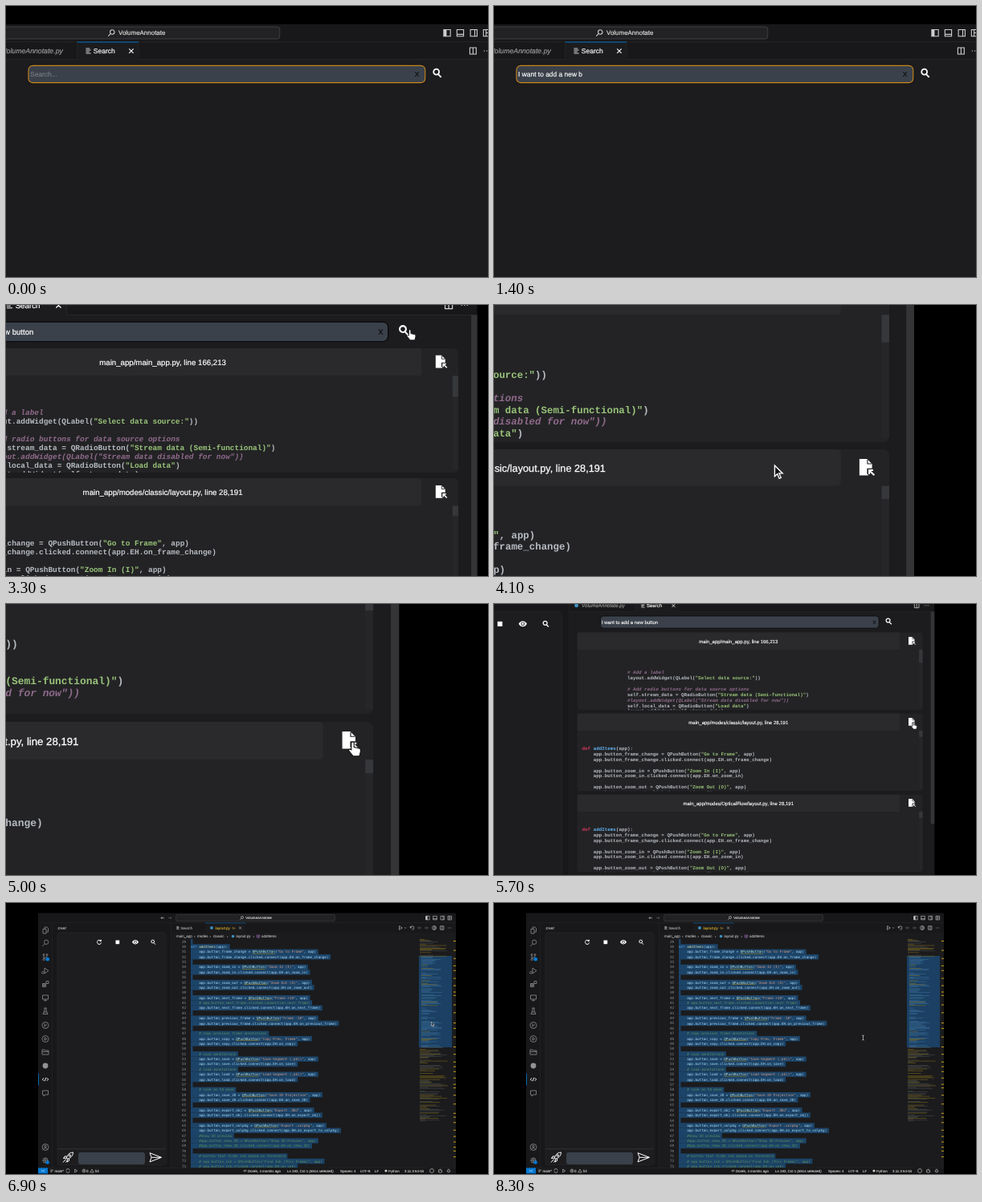
These frames come from a looping animation (600x338 px, 8400 ms). An HTML page:

```html
<!DOCTYPE html>
<html lang="en">
<head>
<meta charset="utf-8">
<title>Code search</title>
<style>
html, body { margin: 0; width: 100%; height: 100%; overflow: hidden; background: #000; }
#stage { display: block; width: 100vw; height: 100vh; }
text { font-family: "Liberation Sans", Arial, sans-serif; white-space: pre; text-rendering: geometricPrecision; }
.result { font: bold 4.59px "Liberation Mono", monospace; }
.code { font: 4.25px "DejaVu Sans Mono", monospace; }
.line { fill: none; stroke: #d0d0d0; stroke-width: .6; }
</style>
</head>
<body>
<svg id="stage" viewBox="0 0 600 338"><g id="world"></g></svg>
<script>
const LOOP = 8400, SHOW_RESULTS = 2300, OPEN_FILE = 6500;
const QUERY = 'I want to add a new button';

// Drawing helpers
const rect = (x, y, w, h, fill, more = '') =>
  `<rect x="${x}" y="${y}" width="${w}" height="${h}" fill="${fill}" ${more}/>`;
const dot = (x, y, r, fill) => `<circle cx="${x}" cy="${y}" r="${r}" fill="${fill}"/>`;
const label = (x, y, str, fill = '#d4d4d4', size = 4.5, more = '') =>
  `<text x="${x}" y="${y + size * .35}" fill="${fill}" stroke="${fill}" stroke-width=".1" font-size="${size}" ${more}>${str}</text>`;
const icon = (x, y, d, more = '') =>
  `<path class="line" transform="translate(${x} ${y})" d="${d}" ${more}/>`;
const group = (id, body) => `<g id="${id}">${body}</g>`;
const style = (color, width) => `style="stroke:${color};stroke-width:${width}"`;
const solid = 'style="fill:#fff;stroke:none"';

const GLASS = 'M1 .8L3 2.9M1.6-.8a1.9 1.9 0 1 1-3.8 0a1.9 1.9 0 1 1 3.8 0';
const TITLE_GLASS = 'M-.7.6L-2.3 2.2M2-.6a1.5 1.5 0 1 1-3 0a1.5 1.5 0 1 1 3 0';
const CLOSE = 'M-1.5-1.5L1.5 1.5M1.5-1.5L-1.5 1.5';
const SPLIT = 'M-2.2-2.2H2.2V2.2H-2.2ZM0-2.2V2.2';
const LIST = 'M-1.7-1.6H1M-1.7-.5H1.7M-1.7.6H.7M-1.7 1.7H1.7';
const RING = 'M2.5 0a2.5 2.5 0 1 1-5 0a2.5 2.5 0 1 1 5 0';
const DOTS = 'M-2 0h.7M-.3 0h.7M1.4 0h.7';

// Source text
const pair = (name, title, handler = name) => [
  `app.button_${name} = QPushButton("${title}", app)`,
  `app.button_${name}.clicked.connect(app.EH.on_${handler})`];
const intro = [...pair('frame_change', 'Go to Frame'), '', ...pair('zoom_in', 'Zoom In (I)'), '',
  ...pair('zoom_out', 'Zoom Out (O)')];
const nextFrame = pair('next_frame', 'Frame +10');
const indent = s => s && '    ' + s;
const itemLines = ['def addItems(app):', ...intro.map(indent)];
const fileLines = ['', ...itemLines, ...[
  '', nextFrame[0], '# app.button_next_frame.clicked.connect(on_next_frame)', nextFrame[1], '',
  ...pair('previous_frame', 'Frame -10'), '',
  '# copy previous frame annotations', ...pair('copy', 'Copy Prev. Frame'), '',
  '# save annotations', ...pair('save', 'Save Segment (.pkl)'),
  '# load annotations', ...pair('load', 'Load Segment (.pkl)'), '',
  '# save as 2d mask', ...pair('save_2D', 'Save 2D Projection'), '',
  ...pair('export_obj', 'Export .OBJ'), '',
  ...pair('export_volpkg', 'Export .volpkg', 'export_to_volpkg'),
  '#Show 3D preview', ...pair('show_3D', 'Show 3D Preview').map(s => '#' + s), '',
  '# button that finds ink based on threshold',
  ...pair('ink', 'Find Ink (This Frame)').map(s => '# ' + s)
].map(indent)];
const labelLines = ['# Add a label', 'layout.addWidget(QLabel("Select data source:"))', '',
  '# Add radio buttons for data source options',
  'self.stream_data = QRadioButton("Stream data (Semi-functional)")',
  '#layout.addWidget(QLabel("Stream data disabled for now"))',
  'self.local_data = QRadioButton("Load data")', 'layout.addWidget(self.stream_data)'];

const resultTheme = { text: '#b6bac1', comment: '#8f6a8b', string: '#98c379', def: '#d2365a', name: '#61afef', call: '#b6bac1', slant: 'italic' };
const fileTheme = { text: '#aedcf8', comment: '#5d9159', string: '#d59a80', def: '#569cd6', name: '#dcdcaa', call: '#c3e2cf', slant: 'normal' };
const paint = (src, theme) => {
  const span = (s, c) => `<tspan fill="${theme[c]}">${s}</tspan>`;
  if (/^\s*#/.test(src)) return `<tspan font-style="${theme.slant}">${span(src, 'comment')}</tspan>`;
  return src.replace(/("[^"]*")|\b(def)\b|(addItems)|(QPushButton)/g,
    (m, str, def, name) => span(m, str ? 'string' : def ? 'def' : name ? 'name' : 'call'));
};
const codeLine = (x, y, src, cls, theme) =>
  `<text class="${cls}" x="${x}" y="${y}" fill="${theme.text}">${paint(src, theme)}</text>`;

// Window frame, activity bar and chat panel
const activity = [
  [34, 'M-3-1.5H1V4H-3ZM-1-1.5V-4H2L3.5-2.5V2H1'],
  [50, 'M-.8 1L-3.7 4M3.8-1.2a2.7 2.7 0 1 1-5.4 0a2.7 2.7 0 1 1 5.4 0'],
  [67.5, 'M-2-2V2M-2 1C1 1 2 0 2-2M-1-3a1 1 0 1 1-2 0a1 1 0 1 1 2 0M3-3a1 1 0 1 1-2 0a1 1 0 1 1 2 0M-1 3a1 1 0 1 1-2 0a1 1 0 1 1 2 0'],
  [84.5, 'M-1-3.5L4 0L-1 3.5ZM-3 1a1.4 1.4 0 1 0 .1 0'],
  [101.5, 'M-3.5-1H.5V3H-3.5ZM-3.5 1H.5M-1.5-1V3M1-4H4V-1H1Z'],
  [118, 'M-3.5-3H3.5V2H-3.5ZM-2 3.7H2M0 2V3.7'],
  [135, 'M-1.5-4H1.5M-1-4V-1L-3 3.5H3L1-1V-4M-2 1H2'],
  [152.5, 'M4 0a4 4 0 1 1-8 0a4 4 0 1 1 8 0M-1-2V2M-1 1L2-1'],
  [169.5, 'M4 0a4 4 0 1 1-8 0a4 4 0 1 1 8 0M-1-1.7L2 0L-1 1.7Z'],
  [186, 'M-4-3H-1L0-2H4V3H-4ZM-4-.5H4'],
  [237, 'M-3.5-3H3.5V2H0L-2 4V2H-3.5Z'],
  [304.5, 'M4 0a4 4 0 1 1-8 0a4 4 0 1 1 8 0M1.3-1a1.3 1.3 0 1 1-2.6 0a1.3 1.3 0 1 1 2.6 0M-2.7 3C-2 .5 2 .5 2.7 3'],
  [321, RING + 'M1 0a1 1 0 1 1-2 0a1 1 0 1 1 2 0M0-4V-2.5M0 4V2.5M-4 0H-2.5M4 0H2.5M-2.8-2.8L-1.8-1.8M2.8 2.8L1.8 1.8M2.8-2.8L1.8-1.8M-2.8 2.8L-1.8 1.8']
];
const shell = [
  rect(40, 12.6, 520, 324.8, '#18181a'),
  rect(40, 24.6, 520, .4, '#2b2b2d'),
  rect(211.5, 14.4, 198, 8.3, '#222224', 'rx="1.6" stroke="#444447" stroke-width=".5"'),
  icon(293.5, 18.6, TITLE_GLASS),
  label(298.3, 18.6, 'VolumeAnnotate', '#dcdcdc', 4.42),
  icon(195, 18.6, 'M2 0H-2M-.5-1.5L-2 0L-.5 1.5'),
  icon(204, 18.6, 'M-2 0H2M.5-1.5L2 0L.5 1.5', style('#666', .6)),
  ...[524.9, 534, 543.3, 552.3].map((x, i) =>
    icon(x, 18.6, 'M-2.3-2.3H2.3V2.3H-2.3Z' + ['M-.7-2.3V2.3', 'M-2.3 1H2.3', 'M.7-2.3V2.3', 'M-.5-2.3V2.3M-.5 0H2.3'][i])),
  rect(522.7, 16.4, 1.7, 4.5, '#d0d0d0'),
  rect(57.6, 25, .4, 305, '#2b2b2d'),
  ...activity.map(([y, d]) => icon(49, y, d, style('#939395', .75))),
  dot(49, 203, 3.4, '#939395'),
  icon(49, 220, 'M-2-1.8L-3.6 0L-2 1.8M2-1.8L3.6 0L2 1.8M.8-2.2L-.8 2.2', style('#fff', .9)),
  rect(40, 212.5, .8, 15, '#0078d4'), dot(51.7, 70.2, 2.4, '#0078d4'), dot(51.7, 323.5, 2.2, '#0078d4'),
  label(64.5, 31.5, 'CHAT', '#d0d0d0', 4.1),
  rect(64, 37, 135.2, 290, '#1d1c1e', 'rx="4" stroke="#29292b" stroke-width=".5"'),
  rect(64, 306.6, 135.2, .5, '#48484b'),
  icon(116, 48.8, 'M2-1.7A2.6 2.6 0 1 0 2.6.7M2.4-3V-1.2H.6', style('#fff', 1)),
  rect(136.5, 46.5, 4.7, 4.7, '#fff'),
  icon(161, 48.8, 'M-4 0C-2-3.7 2-3.7 4 0C2 3.7-2 3.7-4 0Z', solid),
  dot(161, 48.8, 1.8, '#1d1c1e'), dot(161, 48.8, 1.1, '#fff'),
  icon(183, 48.8, GLASS, style('#fff', 1)),
  icon(77.5, 317, 'M-2 1.5C-2-2 1.5-6 6-6C6-1.5 2 2-1.5 2ZM-2-1H-4.5L-6 1.5L-2 1M1 2V4.5L-1.5 6L-1 2M-3 2.5L-6.5 6.5M-1 4L-3 6.5M3-2a1.2 1.2 0 1 1-2.4 0a1.2 1.2 0 1 1 2.4 0', style('#fff', 1)),
  rect(90, 311, 83, 15, '#3a414a', 'rx="3"'),
  icon(186, 317.3, 'M-7-5.6L7.5 0L-7 5.6L-5 0ZM-5 0H7', style('#fff', 1)),
  rect(205.6, 25, .4, 305, '#2b2b2d'),
  rect(40, 330, 520, .4, '#2b2b2d'),
  rect(40, 330.4, 12, 7, '#0078d4'),
  icon(46, 334, 'M-2-1.5L-.5 0L-2 1.5M2-1.5L.5 0L2 1.5', style('#fff', .6)),
  icon(57, 334, 'M-1-2V2M1-2V0L-1 1'), label(60.5, 334, 'main*'),
  icon(77, 334, 'M2-.5A2 2 0 0 0-2-.5M-2 .5A2 2 0 0 0 2 .5'),
  icon(87, 334, 'M-1.3-2L1.8 0L-1.3 2Z'),
  icon(97, 334, 'M2 0a2 2 0 1 1-4 0a2 2 0 1 1 4 0M-.8-.8L.8.8M.8-.8L-.8.8'), label(100, 334, '0'),
  icon(107, 334, 'M0-2L2.3 2H-2.3Z'), label(110.8, 334, '54')
].join('');

// Search page
const PAGE = '#1c1b1d';
const CARD = { x: 213.7, w: 335, h: 75.4, head: 16.8, step: 78.7, top: 57 };
const fileIcon = (x, y) =>
  icon(x, y, 'M-3.3-3.8H.2L2.5-1.5V.5H.2V3L1 3.8H-3.3Z', solid) +
  icon(x, y, 'M.4-3.5V-1.6H2.3', style(PAGE, .4)) +
  icon(x, y, 'M3.5 3.7L1.5 1.7M1.2 3.2V1.4H3', style('#fff', .75));
const card = (i, title, lines, x, firstY) => {
  const { w, h, head } = CARD, y = CARD.top + i * CARD.step, visible = Math.min(h, 330 - y);
  return `<svg x="${CARD.x}" y="${y}" width="${w}" height="${visible}" viewBox="0 0 ${w} ${visible}">` +
    rect(0, 0, w, h, '#232325', 'rx="3"') +
    rect(0, 0, w - 22.3, head, '#2a2a2d', 'rx="2"') +
    rect(w - 3.6, head, 3.6, h - head - 2, '#262629') +
    rect(w - 3.6, head, 3.6, i ? 6 : 12.7, '#36373a') +
    label((w - 22.3) / 2, 8.7, title, '#fff', 4.69, 'text-anchor="middle"') +
    fileIcon(324.5, 8.2) +
    lines.map((s, n) => s && codeLine(x, firstY + n * 5.34 + 1.3, s, 'result', resultTheme)).join('') + '</svg>';
};
const cards = group('results', [
  rect(556.4, 37, 3.6, 206, '#343437'),
  card(0, 'main_app/main_app.py, line 166,213', labelLines, 48.6, 39.3),
  card(1, 'main_app/modes/classic/layout.py, line 28,191', itemLines, 4.7, 34.3),
  card(2, 'main_app/modes/OpticalFlow/layout.py, line 28,191', itemLines, 4.7, 34.3),
  card(3, 'main_app/modes/default/layout.py, line 28,191', itemLines, 4.7, 34.3)
].join(''));
const searchView = group('search', [
  rect(206, 37, 354, 293, PAGE), rect(206, 36.8, 354, .4, '#2b2b2d'),
  rect(269.7, 25, 42.4, 12.2, PAGE), rect(269.7, 24.7, 42.4, .5, '#0078d4'),
  rect(269.5, 25, .3, 12, '#2b2b2d'), rect(312, 25, .3, 12, '#2b2b2d'),
  dot(213, 31, 1.9, '#3c8fc0'),
  label(218, 31.2, 'VolumeAnnotate.py', '#9a9a9a', 4.83, 'font-style="italic"'),
  icon(277.5, 31, LIST),
  label(281, 31.2, 'Search', '#fff', 4.73),
  icon(307.1, 31.1, CLOSE, style('#fff', .6)),
  icon(542.8, 31, SPLIT), icon(552.3, 31, DOTS),
  rect(236.2, 41.2, 273.6, 11.8, '#3a414a', 'id="field" rx="3" stroke-width=".6"'),
  label(237.4, 47.2, '', '#fff', 4.68, 'id="query"'),
  group('tail', label(500.2, 47.2, 'X', '#0c0c0c', 4.68) + icon(515.4, 46.3, GLASS, style('#fff', 1))),
  cards
].join(''));

// File editor
let seed = 7;
const random = () => (seed = seed * 16807 % 2147483647) / 2147483647;
const SELECTED = { top: 66, bottom: 180 };
const minimap = () => {
  const { top, bottom } = SELECTED;
  let out = rect(514, top, 41, bottom - top, '#1b4063');
  for (let y = 45; y < 272; y += 1.1) {
    const inside = y > top && y < bottom, length = random();
    if (random() < .25) continue;
    const yellow = random() < (inside ? .15 : y < 234 ? .55 : .35);
    out += rect(inside ? 517 : 515, y, 6 + length * (inside ? 20 : 30), .6,
      yellow ? '#a88c1c' : inside ? '#4a80aa' : '#59605d', 'opacity=".65"');
  }
  out += rect(556, 44, .3, 286, '#2b2b2d');
  for (let y = 47; y < 320; y += 4 + random() * 9) out += rect(557, y, 3, 1, '#c9a21a');
  return out;
};
const GLYPH = 2.56;
const codeRow = (src, n) => {
  const y = 48.1 + n * 6.37, call = src.startsWith('    app') ? src.indexOf('QPushButton') : -1;
  return rect(230, y - 3.2, (src.length + 1) * GLYPH, 6.4, '#1c4468') +
    label(224, y, n + 29, '#74797f', 4.2, 'class="code" text-anchor="end"') +
    (src && codeLine(230, y + 1.5, src, 'code', fileTheme)) +
    (call > 0 ? `<path d="M${230 + call * GLYPH} ${y + 2.5}h28.2" stroke="#c9a21a" stroke-width=".6" stroke-dasharray="1.2 .4"/>` : '');
};
const crumbs = [[212, 'main_app'], [234, '›'], [238, 'modes'], [253.5, '›'], [258, 'classic'], [275, '›'],
  [286.5, 'layout.py'], [307.5, '›'], [318, 'addItems']];
const status = [[301, 'Doreb, 4 months ago'], [350, 'Ln 192, Col 1 (6914 selected)'],
  [416, 'Spaces: 4'], [441, 'UTF-8'], [459, 'LF'], [476, 'Python'], [496, '3.11.3 64-bit']];
const editorView = group('editor', [
  rect(206, 36.8, 354, 293.2, '#1b1b1d'),
  icon(214, 31, LIST), label(217.5, 31.2, 'Search', '#b0b0b0', 4.6),
  rect(248, 25, 50.5, 12.2, '#1b1b1d'), rect(248, 24.7, 50.5, .5, '#0078d4'),
  dot(256, 31, 1.9, '#3c8fc0'),
  label(260.5, 31.2, 'layout.py', '#dcb42c', 4.6), label(281.5, 31.2, '9+', '#a58826', 4.1),
  icon(291.5, 31.1, CLOSE),
  icon(491, 31, 'M-1.5-2.3L2.3 0L-1.5 2.3Z'), icon(497, 31, 'M-1-.5L0 .5L1-.5'),
  icon(505.5, 31, 'M-2.2-2V0H-.2M-2 0A2.2 2.2 0 1 1 0 2.2'),
  ...[514.5, 523.5].map(x => icon(x, 31, 'M1.2 0a1.2 1.2 0 1 1-2.4 0a1.2 1.2 0 1 1 2.4 0M-2.6 0H-1.2M1.2 0H2.6', style('#666', .6))),
  icon(533, 31, RING + 'M0-2.5V2.5M0 0H2.5'),
  icon(542.8, 31, SPLIT), icon(552, 31, DOTS),
  ...crumbs.map(([x, s]) => label(x, 41.7, s, '#b4b4b4', 4.5)),
  dot(282.5, 41.5, 1.8, '#3c8fc0'), icon(314, 41.5, 'M0-2L2-1V1L0 2L-2 1V-1ZM-2-1L0 0L2-1M0 0V2', style('#b180d7', .5)),
  `<svg x="206" y="45" width="307" height="285" viewBox="206 45 307 285">${fileLines.map(codeRow).join('')}</svg>`,
  minimap(),
  icon(297.5, 334, 'M-2 0H-1M1 0H2M1 0a1 1 0 1 1-2 0a1 1 0 1 1 2 0'),
  ...status.map(([x, s]) => label(x, 334, s, '#d4d4d4', 4.4)),
  dot(473, 334, 1.6, '#ccc'),
  icon(530, 334, RING), icon(540.5, 334, 'M-2-1H2V2H-2ZM0-1V-2.5'), icon(551, 334, 'M-2 1H2L1-1A1 1 0 0 0-1-1ZM-.5 2.2H.5')
].join(''));

// Mouse pointers, with the tip or the centre at the origin
const pointer = group('pointer',
  `<path data-kind="arrow" d="M.2.4V5.4L1.4 4.3L2.3 6.4L3.1 6L2.2 4H3.8Z" fill="#111" stroke="#fff" stroke-width=".5"/>` +
  `<path data-kind="hand" d="M-.6 0Q0-.6.6 0V2L3.2 2.6Q3.6 2.8 3.5 4L3 6H.2L-1.8 3.5Q-1.6 2.6-.6 3.2Z" fill="#fff" stroke="#111" stroke-width=".4"/>` +
  `<path data-kind="beam" d="M-1.2-3Q0-3 0-2V2Q0 3-1.2 3M1.2-3Q0-3 0-2M0 2Q0 3 1.2 3" fill="none" stroke="#e8e8e8" stroke-width=".65"/>`);

const $ = id => document.getElementById(id);
$('world').innerHTML = shell + searchView + editorView + pointer;

// Monotone cubic through rows of [time, ...values]
const sample = (keys, t) => {
  const last = keys.length - 1;
  if (t <= keys[0][0]) return keys[0].slice(1);
  if (t >= keys[last][0]) return keys[last].slice(1);
  const i = keys.findIndex(k => k[0] > t) - 1;
  const [a, b] = [keys[i], keys[i + 1]], span = b[0] - a[0], u = (t - a[0]) / span;
  const slope = (j, c) => (keys[j + 1][c] - keys[j][c]) / (keys[j + 1][0] - keys[j][0]);
  const tangent = (j, c) => {
    if (j === 0 || j === last) return 0;
    const p = slope(j - 1, c), q = slope(j, c);
    return p * q > 0 ? 2 * p * q / (p + q) : 0;
  };
  return a.slice(1).map((v, n) => {
    const c = n + 1, m0 = tangent(i, c) * span, m1 = tangent(i + 1, c) * span, d = b[c] - v;
    return v + u * (m0 + u * (3 * d - 2 * m0 - m1 + u * (m0 + m1 - 2 * d)));
  });
};

// [time, zoom, x, y]
const camera = [
  [1850, 1.805, -398.4, 0], [2500, 1.73, -351.8, -1.1], [2700, 1.76, -372, -8],
  [3300, 2.06, -567, -63.6], [4100, 2.71, -994.6, -187.6], [4500, 2.9, -1138, -246],
  [4900, 2.9, -1138, -246], [5400, 1.8, -480, -106.5], [5700, 1.285, -171.4, -38], [6250, 1, 0, 0]];
const mouse = [
  [1600, 484, 26], [2150, 519.3, 46.2], [3400, 519.3, 46.2], [4100, 495.8, 142.7],
  [4700, 539.5, 145], [6550, 539.5, 145], [6800, 529.3, 147.8], [7100, 529.3, 147.8], [7800, 459.5, 168]];
const kinds = [[2050, 'arrow'], [3450, 'hand'], [4550, 'arrow'], [OPEN_FILE, 'hand'], [7200, 'arrow'], [LOOP, 'beam']];

const show = (el, on) => { el.style.display = on ? '' : 'none'; };
const place = (el, x, y, scale = 1) => el.setAttribute('transform', `translate(${x} ${y}) scale(${scale})`);

const draw = t => {
  const [zoom, x, y] = sample(camera, t);
  place($('world'), x, y, zoom);

  const found = t >= SHOW_RESULTS, focused = t < 2200;
  show($('search'), t < OPEN_FILE);
  show($('editor'), t >= OPEN_FILE);
  show($('results'), found);
  const typed = QUERY.slice(0, Math.max(0, Math.floor((t - 40) / 62)));
  const ink = typed ? '#fff' : '#767b82';
  $('query').textContent = typed || 'Search...';
  $('query').setAttribute('fill', ink);
  $('query').setAttribute('stroke', ink);
  $('field').setAttribute('width', found ? 270 : 273.6);
  $('field').setAttribute('stroke', focused ? '#c9861f' : '#08080a');
  place($('tail'), found ? 0 : 2.4, 0);

  const kind = kinds.find(k => t < k[0])[1];
  place($('pointer'), ...sample(mouse, t));
  show($('pointer'), t >= 1650);
  for (const el of $('pointer').children) show(el, el.dataset.kind === kind);
};

const start = performance.now();
const tick = () => {
  draw((performance.now() - start) % LOOP);
  requestAnimationFrame(tick);
};
tick();
</script>
</body>
</html>
```
